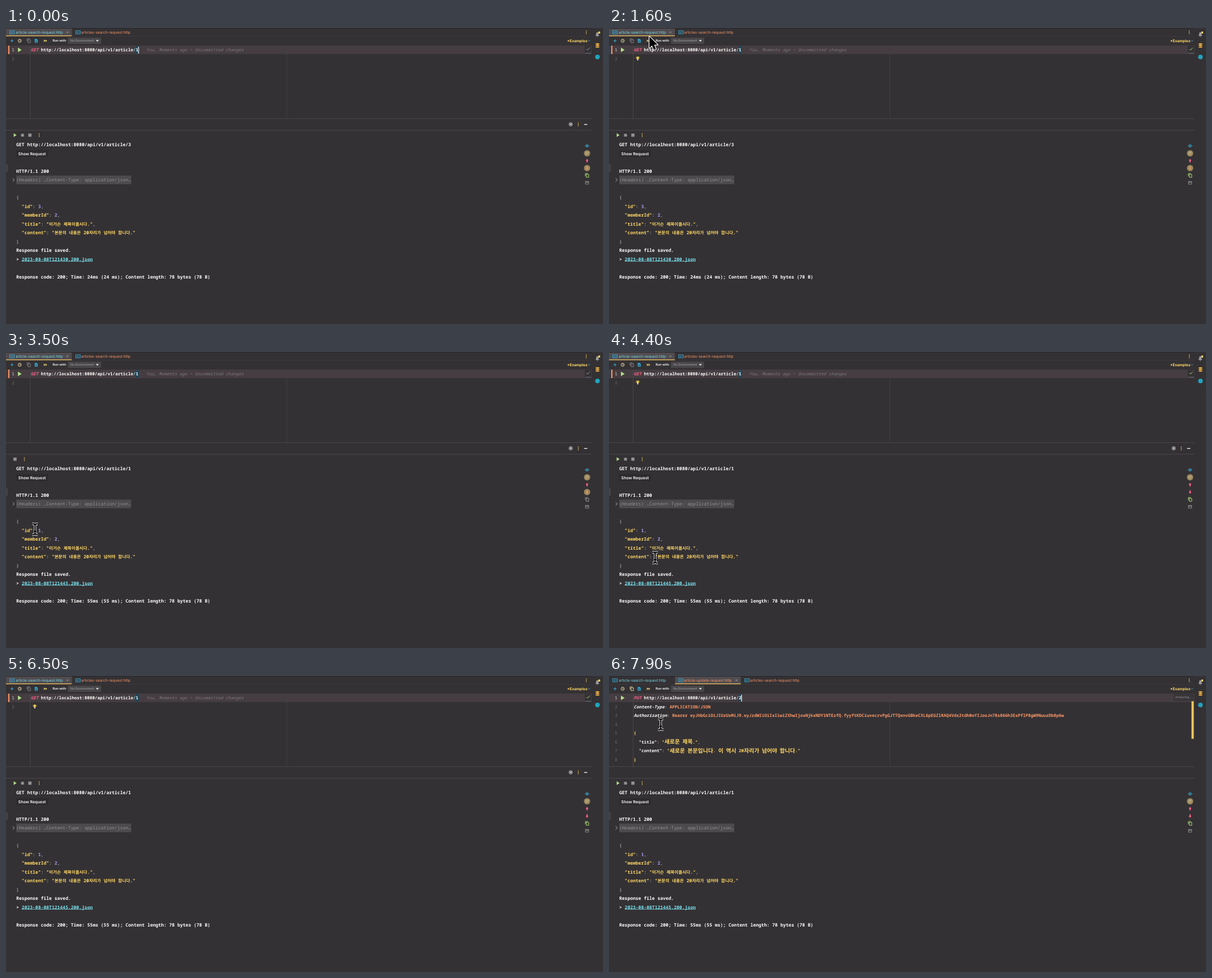
These frames come from a looping animation (1049x521 px, 8000 ms). An HTML page with a canvas:

```html
<!DOCTYPE html>
<html lang="en">
<head>
<meta charset="utf-8">
<title>HTTP client</title>
<style>
html, body { margin: 0; width: 100%; height: 100%; overflow: hidden; background: #343134; }
canvas { display: block; }
</style>
</head>
<body>
<canvas id="stage" width="1049" height="521"></canvas>
<script>
const ctx = document.getElementById('stage').getContext('2d');
const LOOP = 8000, STEP = 100, LINE = 15.5;
const MONO = '"Noto Sans Mono", "Noto Sans CJK KR", monospace';
const UI = 'Inter, "Noto Sans", sans-serif';
const bg = '#343134', white = '#fcfcfa', gray = '#939293', dim = '#6d6a6d', rule = '#4a474a',
  pink = '#ff6188', orange = '#fc9867', yellow = '#ffd866', green = '#a9dc76', cyan = '#78dce8',
  purple = '#ab9df2', tan = '#9b875c', blue = '#35a7d0';

// ---- drawing helpers ----
function box(x, y, w, h, color) { ctx.fillStyle = color; ctx.fillRect(x, y, w, h); }

function disc(x, y, r, color) {
  ctx.fillStyle = color;
  ctx.beginPath(); ctx.arc(x, y, r, 0, 7); ctx.fill();
}

function ring(x, y, r, color) {
  ctx.strokeStyle = color; ctx.lineWidth = 1;
  ctx.beginPath(); ctx.arc(x, y, r, 0, 7); ctx.stroke();
}

function shape(d, x, y, fill, stroke, width = 1) {
  const path = new Path2D(d);
  ctx.save();
  ctx.translate(x, y);
  ctx.lineJoin = 'round';
  if (stroke) { ctx.strokeStyle = stroke; ctx.lineWidth = width; ctx.stroke(path); }
  if (fill) { ctx.fillStyle = fill; ctx.fill(path); }
  ctx.restore();
}

function label(text, x, y, size, color, weight = 400) {
  ctx.font = `${weight} ${size}px ${UI}`;
  ctx.fillStyle = color;
  ctx.fillText(text, x, y + size * 0.36);
}

// Runs are [text, color, style]; Korean syllables have their own size and cell.
function mono(x, y, size, wide, ...runs) {
  for (const [text, color, style = '600'] of runs) {
    ctx.fillStyle = color;
    for (const ch of text) {
      const korean = ch >= '가' && ch <= '힣';
      const em = korean ? wide / 0.92 : size;
      ctx.font = `${style} ${em}px ${MONO}`;
      ctx.fillText(ch, x, y + em * 0.35);
      x += korean ? wide : size * 0.6;
    }
  }
}

const code = (row, ...runs) => mono(43.5, 38.5 + row * LINE, 7.5, 9, ...runs);
const log = (row, ...runs) => mono(18, 205.5 + row * LINE, 8, 6.92, ...runs);
const play = (x, y, s) => shape(`M0 ${-s}L${s * 1.6} 0L0 ${s}Z`, x, y, '#b4e08a');
const dots = (x, y) => [-2.5, 0, 2.5].forEach(d => box(x - 0.6, y + d - 0.6, 1.3, 1.3, yellow));
const copyIcon = (x, y, c) => shape('M-3 1.5V-3.2H1.5M-1.3 -1.5H3V3.5H-1.3Z', x, y, null, c);
const arrowIcon = (y, dir, c) =>
  shape(`M0 ${-3 * dir}L2.6 0H1V${3 * dir}H-1V0H-2.6Z`, 1021, y, c);

// ---- pointer ----
const route = [
  [800, 130, 250], [1500, 71, 15], [1800, 71, 15], [2400, 26, 36], [2900, 26, 36],
  [3400, 51, 312], [3700, 51, 312], [4400, 81, 362], [5200, 226, 369], [5300, 226, 369],
  [5500, 160, 341], [5700, 160, 341], [6300, -25, 300], [7600, -25, 130], [7900, 91, 85]
];

function pointerAt(t) {
  const i = route.findIndex(p => p[0] > t);
  if (i === 0) return null;
  if (i < 0) return route[route.length - 1].slice(1);
  const [t0, x0, y0] = route[i - 1], [t1, x1, y1] = route[i];
  const u = (t - t0) / (t1 - t0), e = u * u * (3 - 2 * u);
  return [x0 + (x1 - x0) * e, y0 + (y1 - y0) * e];
}

function drawPointer([x, y]) {
  if (y < 31 || (y > 160 && y < 197)) {
    shape('M0 0V20L4.6 15.8L8 23.5L11.4 22L8.2 14.6H14.5Z', x, y, '#000', '#fff', 2.4);
  } else if (x < 43 && y < 159) {
    shape('M-3 0Q-1 -2 1 0L2.5 6Q4.5 4 6 6Q8 5 9 7Q11 6 11.5 9L11 14L9 18H0L-5 11' +
      'Q-6 8 -3 8.5L-1 10Z', x, y, '#fff', '#000', 1.4);
    shape('M2.5 10V15M5 10V15M7.5 10V15', x, y, null, '#000', 0.8);
  } else {
    const beam = 'M-5 -9.5H-2L0 -8L2 -9.5H5M0 -8V8M-5 9.5H-2L0 8L2 9.5H5M-2.5 3.5H2.5';
    shape(beam, x, y, null, '#fff', 4);
    shape(beam, x, y, null, '#000', 2.2);
  }
}

// ---- window parts ----
function drawTabs(updating) {
  const tabs = [['article-search-request.http', cyan], ['articles-search-request.http', orange]];
  if (updating) tabs.splice(1, 0, ['article-update-request.http', orange]);
  const active = updating ? 1 : 0;
  box(0, 0, 1029, 1, '#292629');
  box(0, 14, 1029, 0.6, '#403d40');
  tabs.forEach(([name, color], i) => {
    const x = i * 116;
    if (i === active) {
      box(x, 1, 115.5, 13, '#504c50');
      box(x, 13, 115.5, 1.4, '#e5b95e');
      shape('M-1.5 -1.5L1.5 1.5M1.5 -1.5L-1.5 1.5', x + 108, 7.5, null, '#aaa', 0.8);
    }
    ctx.strokeStyle = blue;
    ctx.lineWidth = 0.9;
    ctx.strokeRect(x + 6.5, 4.8, 8, 5.6);
    label('API', x + 7.5, 7.7, 3.6, blue, 700);
    label(name, x + (i ? 16 : 17), 7.8, 6.5, color);
  });
  dots(1019.5, 7.5);
}

function drawToolbar(updating) {
  shape('M-2.7 0H2.7M0 -2.7V2.7', 10.5, 22.5, null, blue, 1.1);
  ring(24, 22.5, 2.8, '#e6d9a8');
  shape('M0 -1.8V0.3H1.6', 24, 22.5, null, '#e6d9a8', 0.8);
  copyIcon(40, 22.3, updating ? '#d6cf9a' : '#858285');
  shape('M-2.5 -3.2H1L2.7 -1.5V3.3H-2.5Z', 53, 22.5, blue);
  shape('M0 -1.5V1.5M-1.4 0.3L0 1.7L1.4 0.3', 53, 22.7, null, bg, 0.8);
  shape('M0 -2.2L2.8 0L0 2.2ZM3 -2.2L5.8 0L3 2.2Z', 66.5, 22.5, '#e5d36e');
  label('Run with:', 82, 22.5, 5.5, white, 600);
  box(109, 17, 58, 11, '#49464a');
  label('No Environment', 113, 22.5, 5.5, '#aaa7aa');
  shape('M-2.6 -1.4H2.6L0 1.8Z', 160.5, 22.5, '#ddd');
  label('*Examples', 986, 22.5, 6.6, yellow, 700);
  shape('M-1.8 -1L0 1L1.8 -1', 1024.5, 22.3, null, blue, 0.9);
}

function lineNumbers(count) {
  for (let n = 1; n <= count; n++) {
    mono(10.3, 38.5 + (n - 1) * LINE, 7.5, 9, [String(n), n === 1 ? '#d8d5d8' : dim, '400']);
  }
}

function drawEditor(t, updating) {
  box(0, 31, 1029, 15, '#453d41');
  box(42, 31, 1, 128, rule);
  box(493, 31, 1, 128, '#423f42');
  lineNumbers(updating ? 8 : 2);
  box(228.4, 32, 4.6, 13, '#174a60');
  code(0, [updating ? 'PUT ' : 'GET ', pink, 'italic 600'],
    ['http://localhost:8080/api/v1/article', white], ['/', cyan], [updating ? '2' : '1', white]);

  if (updating) {
    const punct = [': ', gray];
    code(1, ['Content-Type', white, 'italic 700'], punct, ['APPLICATION/JSON', orange]);
    code(2, ['Authorization', white, 'italic 700'], punct,
      ['Bearer eyJhbGciOiJIUzUxMiJ9.eyJzdWIiOiIxIiwiZXhwIjoxNjkxNDY1NTEzfQ.' +
       'fyyftKDCiuvecrvPgGJTTQxnvGBkeCXL6pEGZlRAQ4Vds2tdh0oYIJooJn78s866h3EsPflP8gW9NuuzDb8p6w', orange]);
    code(4, ['{', yellow]);
    code(5, ['  "title"', white, '700'], punct, ['"새로운 제목."', yellow], [',', gray]);
    code(6, ['  "content"', white, '700'], punct, ['"새로운 본문입니다. 이 역시 20자리가 넘어야 합니다."', yellow]);
    code(7, ['}', yellow]);
    box(1023.5, 44.5, 4, 66, '#f2c85c');
    box(992, 31, 36, 12.5, '#393639');
    label('Analyzing…', 995, 37.3, 5.2, gray);
  } else {
    box(4, 31, 2, 15, orange);
    mono(246.5, 38.5, 7.5, 9, ['You, Moments ago • Uncommitted changes', '#7d787c', 'italic 500']);
    const busy = t < 500 || (t >= 3000 && t < 3700);
    box(1017, 31.5, 11, 11.5, bg);
    shape('M-2.7 0L-0.7 2L3 -2.2', 1022.5, 37, null, busy ? '#a5a2a5' : green, 1);
    box(1019, 44, 9, 0.8, '#527582');
    if ((t >= 900 && t < 2300) || t >= 4400) {
      disc(50.5, 52.7, 2.4, '#f2cf4d');
      box(49.4, 55, 2.2, 2, '#ddd');
      shape('M-4 0H-3M3 0H4M-3 -3L-2.3 -2.3M3 -3L2.3 -2.3', 50.5, 52.7, null, '#f2cf4d', 0.8);
    }
  }
  play(21, 38.5, 4);
  if (updating || (t < 2400 && t % 1000 < 500)) box(232.3, 33, 1.2, 12, '#fff');
}

function drawContent(valueColor) {
  log(10, ['  "content"', yellow], [': ', gray], ['"본문의 내용은 20자리가 넘어야 합니다."', valueColor]);
}

function drawConsole(t, updating, pointer) {
  const done = t >= 3100, running = t >= 2900 && t < 3700;
  box(0, 159, 1029, 1, rule);
  box(0, 179.5, 1029, 1, rule);
  if (t < 1300 || (t >= 3100 && !updating)) {
    ring(992.3, 169.5, 2.9, '#ddd');
    disc(992.3, 169.5, 1.4, '#ddd');
    dots(1005.5, 169.5);
    box(1015.8, 169, 5.6, 1.4, '#eee');
  }
  if (running) {
    box(13, 185.8, 5.6, 5.6, gray);
    dots(32.3, 188.5);
  } else {
    play(13.5, 188.5, 3.2);
    disc(29, 188.7, 2.6, gray);
    shape('M-3 -1.5H3M-3 1.5H3', 29, 188.7, null, gray, 0.7);
    box(39.2, 185.8, 5.6, 5.6, gray);
    dots(58.3, 188.5);
  }
  box(0, 240, 3, 13, '#464346');

  log(0, [`GET http://localhost:8080/api/v1/article/${done ? 1 : 3}`, white]);
  box(18, 215, 56, 12, '#2e2b2e');
  label('Show Request', 21.6, 221, 7, white, 600);
  log(3, ['HTTP/1.1 200', white]);
  shape('M-1.5 -2.8L1.5 0L-1.5 2.8', 13.2, 267.3, null, '#bbb', 0.9);
  box(18, 259.7, 202, 15.3, '#4d4a4d');
  log(4, ['(Headers) …Content-Type: application/json…', gray, '500']);
  log(6, ['{', gray]);
  log(7, ['  "id"', yellow], [': ', gray], [done ? '1' : '3', purple], [',', gray]);
  log(8, ['  "memberId"', yellow], [': ', gray], ['2', purple], [',', gray]);
  log(9, ['  "title"', yellow], [': ', gray], ['"이거슨 제목이올시다."', yellow], [',', gray]);
  drawContent(yellow);
  if (t >= 4500 && t < 5400) {
    const width = Math.max(0, Math.min(229, pointer[0] + 3) - 80.5);
    box(80.5, 353, width, 15, '#4d4a4d');
    ctx.save();
    ctx.beginPath(); ctx.rect(80.5, 353, width, 15); ctx.clip();
    drawContent(white);
    ctx.restore();
  }
  if ((t >= 5500 && t < 6500) || (t >= 7000 && t < 7300)) box(156.5, 339, 1.1, 12, '#fff');
  log(11, ['}', gray]);
  log(12, ['Response file saved.', white]);
  log(13, ['> ', white], [`2023-08-08T1214${done ? 45 : 30}.200.json`, cyan]);
  box(27.6, 410.3, 124.8, 0.8, cyan);
  const ms = done ? 55 : 24;
  log(15, [`Response code: 200; Time: ${ms}ms (${ms} ms); Content length: 78 bytes (78 B)`, white]);

  shape('M-3.6 0Q0 -4 3.6 0Q0 4 -3.6 0Z', 1021, 207.5, null, blue, 1);
  disc(1021, 207.5, 1.2, blue);
  disc(1021, 220.5, 5.5, tan);
  shape('M-3 -2H3M-3 0H3M-3 2H1', 1021, 220.5, null, '#c9bd9c', 0.8);
  arrowIcon(233.5, 1, pink);
  if (t < 4400) disc(1021, 246.5, 5.5, tan);
  arrowIcon(246.5, -1, t < 4400 ? '#d59a68' : pink);
  copyIcon(1021, 259.3, running ? gray : green);
  ctx.strokeStyle = gray;
  ctx.lineWidth = 0.9;
  ctx.strokeRect(1018.2, 270, 5.6, 4.8);
  box(1018, 271, 6, 1, gray);
}

function drawSidebar() {
  shape('M-3.5 2.5Q-2 1 -2 -1Q-2 -4 0 -4Q2 -4 2 -1Q2 1 3.5 2.5ZM-1 3.2H1V4.2H-1Z', 1039, 11.5, '#a09da0');
  disc(1042.3, 8, 1.9, yellow);
  for (const y of [28.2, 31, 33.8]) {
    shape('M-3.4 -0.8Q0 -2 3.4 -0.8V0.3Q0 1.7 -3.4 0.3Z', 1039.3, y, '#f5b544');
  }
  disc(1039.3, 51, 4, '#20a5bd');
}

function draw(now) {
  const t = Math.floor(now % LOOP / STEP) * STEP;
  const updating = t >= 7600, pointer = pointerAt(t);
  ctx.textRendering = 'geometricPrecision';
  box(0, 0, 1049, 521, bg);
  drawTabs(updating);
  drawToolbar(updating);
  drawEditor(t, updating);
  drawConsole(t, updating, pointer);
  drawSidebar();
  if (pointer) drawPointer(pointer);
}

const start = performance.now();
function tick() {
  draw(performance.now() - start);
  requestAnimationFrame(tick);
}
tick();
</script>
</body>
</html>
```
